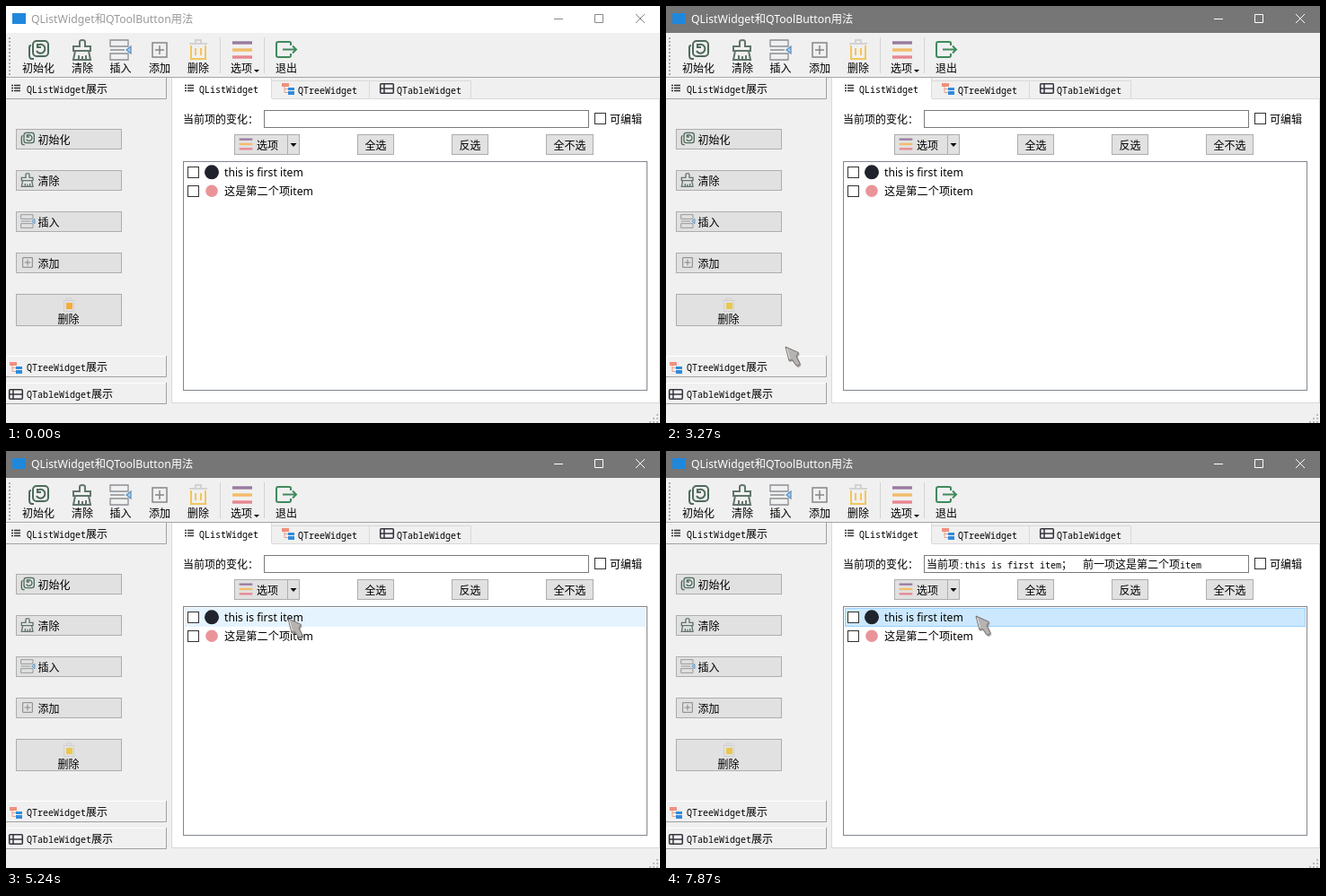
These frames come from a looping animation (728x465 px, 7.99 s). An HTML page:

```html
<!DOCTYPE html>
<html lang="zh-CN">
<head>
<meta charset="utf-8">
<style>
html, body { margin: 0; width: 100%; height: 100%; overflow: hidden; background: #f0f0f0; }
svg { display: block; width: 728px; height: 465px; }
text { font: 12px 'Noto Sans CJK SC', 'Noto Sans CJK', sans-serif; white-space: pre; }
.mono { font: 10px 'Noto Sans Mono', monospace; }
.ui { font: 12.2px 'Noto Sans', 'Noto Sans CJK SC', 'Noto Sans CJK', sans-serif; }
.line { fill: none; stroke-width: 1; }
rect { shape-rendering: crispEdges; }
</style>
</head>
<body>
<svg viewBox="0 0 728 465">
<defs>
  <g id="init" fill="none" stroke="#4e6b5b" stroke-width="2">
    <path d="M7 22H5Q2 22 2 18V9Q2 7 4 7"/>
    <rect x="6" y="2" width="17" height="17" rx="4" style="shape-rendering:auto"/>
    <path d="M11 7A5 5 0 1 1 10 13M11 5V9H15"/>
  </g>
  <g id="clear" fill="none" stroke="#62756b" stroke-width="2">
    <path d="M9 8V3Q9 1 12 1T15 3V8H21V13H2V8ZM4 13L2 23H21L19 13M8 23V18M12 23V19M16 23V18"/>
  </g>
  <g id="insert" fill="none" stroke="#8b8f92" stroke-width="1.3">
    <path d="M1 1H21V8H1ZM1 12H17M1 16H21V23H1Z"/>
    <path d="M24 8V16L19 12Z" fill="#a9cdec" stroke="#5b93c4"/>
  </g>
  <g id="add" fill="none" stroke="#858585" stroke-width="1.5">
    <path d="M4 4H20V20H4ZM12 7V17M7 12H17"/>
  </g>
  <g id="trash" fill="none" stroke-width="2">
    <path d="M9 4V1H15V4M2 5H22" stroke="#d2d2d2"/>
    <path d="M4 7V22H20V7M9 10V18M15 10V18" stroke="#f3c65a"/>
  </g>
  <g id="options" fill="none" stroke-width="3.4">
    <path d="M1 4H23" stroke="#987a9f"/>
    <path d="M1 12H23" stroke="#f3bc68"/>
    <path d="M1 20H23" stroke="#e88691"/>
  </g>
  <g id="exit" fill="none" stroke="#3f8a5d" stroke-width="2">
    <path d="M17 7V4Q17 3 15 3H3Q1 3 1 5V18Q1 20 3 20H15Q17 20 17 18V16M8 11.5H23M19 7.5L23 11.5L19 15.5"/>
  </g>
  <g id="list" fill="none" stroke="#333">
    <path d="M0 1.5H2M0 4.5H2M0 7.5H2M3 1.5H10M3 4.5H10M3 7.5H10" stroke-width="1.5"/>
  </g>
  <g id="tree">
    <path d="M3 4V10.5H8M3 6.5H8" fill="none" stroke="#e9a08a"/>
    <rect width="8" height="4" fill="#f0907c"/>
    <path d="M7 5h7v3h-7zM7 9h7v4h-7z" fill="#2f8bdc"/>
  </g>
  <g id="table" fill="none" stroke="#34343f" stroke-width="1.5">
    <rect x=".7" y=".7" width="14.6" height="10.6" rx="1" style="shape-rendering:auto"/>
    <path d="M5 1V11M1 6H15"/>
  </g>
</defs>
<g id="stage"></g>
<g id="pointer">
  <path d="M1 1L16 8L13.5 12L17.5 20Q16 24 13 22.5L8 16L4.5 17Z" fill="#666" opacity=".55"/>
  <path d="M0 0L14.5 6.5L12 10.5L16 18.5Q15 22 12 21L7.5 14.5L4 15.5Z" fill="#b6b3b1" stroke="#77716f"/>
  <path d="M1.5 2L4.5 13" stroke="#e6e4e3" fill="none"/>
</g>
</svg>
<script>
const LOOP = 7990;
const stage = document.getElementById('stage');
const pointer = document.getElementById('pointer');

// [start, end, steps, waypoints x,y...]
const moves = [
  [100, 540, 5, [314, 326, 255, 270, 180, 215, 108, 150, 109, 99]],
  [760, 1520, 8, [109, 98, 120, 115, 130, 120, 125, 100, 119, 92]],
  [1640, 1640, 1, [119, 91]],
  [2290, 3050, 8, [120, 91, 121, 100, 124, 210, 126, 325, 133, 376]],
  [3170, 3380, 3, [133, 380, 135, 397]],
  [3580, 3790, 3, [134, 376, 122, 262, 88, 152]],
  [3930, 4010, 2, [91, 150, 94, 148]],
  [4150, 4910, 8, [105, 152, 180, 170, 250, 192, 310, 203]],
  [5010, 5340, 4, [312, 198, 314, 190, 314, 187, 314, 187]],
  [6110, 6330, 3, [316, 199, 319, 210, 319, 210]],
  [6550, 6550, 1, [321, 210]],
  [7100, 7220, 2, [325, 209, 330, 208]],
  [7650, 7870, 3, [336, 200, 345, 184, 345, 184]]
];

function pointerAt(t) {
  const move = moves.filter(m => m[0] <= t).pop();
  if (!move) return null;
  const [start, end, steps, p] = move;
  if (steps < 2) return p;
  const gap = (end - start) / (steps - 1);
  const k = Math.min(steps - 1, Math.floor((t - start) / gap + 0.01)) / (steps - 1);
  const pos = k * (p.length / 2 - 1);
  const i = Math.min(Math.floor(pos), p.length / 2 - 2), f = pos - i;
  return [0, 1].map(a => p[2 * i + a] * (1 - f) + p[2 * i + 2 + a] * f);
}

const rect = (x, y, w, h, fill, stroke) => stroke
  ? `<rect x="${x + .5}" y="${y + .5}" width="${w - 1}" height="${h - 1}" fill="${fill}" stroke="${stroke}"/>`
  : `<rect x="${x}" y="${y}" width="${w}" height="${h}" fill="${fill}"/>`;
const line = (d, color) => `<path class="line" d="${d}" stroke="${color}"/>`;
const icon = (id, x, y, size = 24) =>
  `<use href="#${id}" transform="translate(${x} ${y}) scale(${size / 24})"/>`;
const text = (x, y, s, extra = '') => `<text x="${x}" y="${y}" ${extra}>` +
  s.replace(/[\x20-\x7e]+/g, '<tspan class="mono">$&</tspan>') + '</text>';
const centered = (x, y, s) => text(x, y, s, 'text-anchor="middle"');
const uiText = (x, y, s, fill = '#000', size = 12.2) =>
  `<text class="ui" x="${x}" y="${y}" fill="${fill}" style="font-size:${size}px">${s}</text>`;
const checkbox = (x, y) => rect(x, y, 13, 13, '#fff', '#333');

function button(x, y, w, h, over) {
  return rect(x, y, w, h, over ? '#e5f1fb' : '#e1e1e1', over ? '#0078d7' : '#adadad');
}

function titleBar(active) {
  const ink = active ? '#fff' : '#888';
  return rect(0, 0, 728, 30, active ? '#767676' : '#fff') +
    rect(7, 8, 15, 12, '#1f88dc') +
    uiText(28, 19, 'QListWidget和QToolButton用法', active ? '#fff' : '#999', 12.3) +
    line('M610 14.5H620M655.5 9.5H664.5V18.5H655.5ZM701 9L711 19M711 9L701 19', ink);
}

function toolBar() {
  const items = [['init', 24, 36, '初始化'], ['clear', 73, 85, '清除'], ['insert', 115, 127.5, '插入'],
    ['add', 159, 171, '添加'], ['trash', 202, 214, '删除'], ['options', 251, 262, '选项'], ['exit', 300, 312, '退出']];
  let s = line('M0 79.5H728', '#a5a5a5') + line('M238.5 35V75M287.5 35V75', '#d2d2d2') +
    `<path d="M4 35V77" stroke="#a8a8a8" stroke-width="2" stroke-dasharray="2 2"/>`;
  for (const [id, x, mid, label] of items) s += icon(id, x, 37) + centered(mid, 73.5, label);
  return s + '<path d="M276 71h6l-3 3z"/>';
}

function header(y, id, x, label, sunken) {
  return line(`M.5 ${y + 23}V${y + .5}H178`, sunken ? '#c8c8c8' : '#fff') +
    line(`M178.5 ${y}V${y + 23.5}H0`, sunken ? '#fff' : '#a0a0a0') +
    icon(id, x, y + 7) + text(23, y + 16.5, label);
}

function sidePanel(over, t) {
  let s = header(80, 'list', 6, 'QListWidget展示', t >= 760 && over(0, 80, 179, 24)) +
    header(390, 'tree', 4, 'QTreeWidget展示') + header(420, 'table', 3, 'QTableWidget展示');
  [['init', '初始化'], ['clear', '清除'], ['insert', '插入'], ['add', '添加']].forEach(([id, label], i) => {
    const y = 137 + 46 * i;
    s += button(11, y, 118, 23, over(11, y, 118, 23)) + icon(id, 16, y + 3, 16) + text(35.5, y + 16.5, label);
  });
  return s + button(11, 321, 118, 36, over(11, 321, 118, 36)) +
    line('M67 328V326H73V328M63 328.5H77M64.5 330V340.5H75.5V330', '#d0d0d0') +
    rect(67, 331, 7, 7, t < 3050 ? '#f3ad3c' : '#e8c84e') + centered(69.5, 353.5, '删除');
}

function tabs() {
  return rect(184, 103, 544, 340, '#fff', '#d9d9d9') +
    rect(295, 83, 110, 21, '#f0f0f0', '#d9d9d9') + rect(404, 83, 114, 21, '#f0f0f0', '#d9d9d9') +
    rect(184, 80, 112, 25, '#fff') + line('M184.5 105V80M295.5 80V103', '#d9d9d9') +
    icon('list', 199, 87) + text(215, 96.5, 'QListWidget') +
    icon('tree', 307, 86) + text(325, 97.5, 'QTreeWidget') +
    icon('table', 416, 86) + text(435, 97.5, 'QTableWidget');
}

function controls(over, message) {
  let s = text(197, 130.5, '当前项的变化：') + rect(287, 116, 362, 20, '#fff', '#7a7a7a') +
    text(290, 130.5, message) + checkbox(655, 119) + text(672, 130.5, '可编辑') +
    button(254, 143, 73, 23, over(254, 143, 73, 23)) + line('M313.5 144V165', '#adadad') +
    icon('options', 259, 146, 16) + text(279, 159.5, '选项') + '<path d="M316.5 153h7l-3.5 4z"/>';
  for (const [x, w, label] of [[391, 41, '全选'], [496, 41, '反选'], [601, 53, '全不选']])
    s += button(x, 143, w, 23, over(x, 143, w, 23)) + centered(x + w / 2, 159.5, label);
  return s;
}

const names = ['this is first item', '这是第二个项item'];

function listView(over, selected, editing) {
  let s = rect(197, 173, 517, 256, '#fff', '#828790');
  names.forEach((name, i) => {
    const y = 175 + 21 * i, edit = editing && i === selected;
    if (edit) s += rect(199, y, 513, 21, '#d9d9d9');
    else if (i === selected) s += rect(199, y, 513, 21, '#cce8ff', '#99d1ff');
    else if (over(199, y, 513, 21)) s += rect(199, y, 513, 21, '#e5f3ff');
    if (edit) s += rect(240, y, 472, 21, '#fff', '#555') + rect(243, y + 2, 88, 17, '#0078d7');
    s += checkbox(202, y + 4) +
      `<circle cx="229" cy="${y + 10.3}" r="${i ? 6.8 : 8}" fill="${i ? '#ea9499' : '#20232c'}"/>` +
      uiText(243, y + 15, name, edit ? '#fff' : '#000');
  });
  return s;
}

function grip() {
  let s = '';
  for (let i = 0; i < 3; i++)
    for (let j = 0; j <= i; j++) s += rect(724 - 4 * j, 455 + 4 * i - 0, 2, 2, '#bdbdbd');
  return s;
}

const fixed = rect(0, 0, 728, 465, '#f0f0f0') + toolBar() + tabs() + grip();
let last = '';

function draw(t) {
  const at = pointerAt(t);
  const over = (x, y, w, h) => !!at && at[0] >= x && at[0] < x + w && at[1] >= y && at[1] < y + h;
  const selected = t < 5340 ? -1 : t >= 6330 && t < 7870 ? 1 : 0;
  const previous = t < 6330 ? '不存在' : names[1 - selected];
  const message = selected < 0 ? '' : `当前项:${names[selected]}；  前一项${previous}`;
  const html = fixed + titleBar(t >= 760) + sidePanel(over, t) + controls(over, message) +
    listView(over, selected, t >= 5560 && t < 6330);
  if (html !== last) stage.innerHTML = last = html;
  pointer.setAttribute('visibility', at ? 'visible' : 'hidden');
  if (at) pointer.setAttribute('transform', `translate(${at[0]} ${at[1]})`);
}

const began = performance.now();
function tick() {
  draw((performance.now() - began) % LOOP);
  requestAnimationFrame(tick);
}
tick();
</script>
</body>
</html>
```
